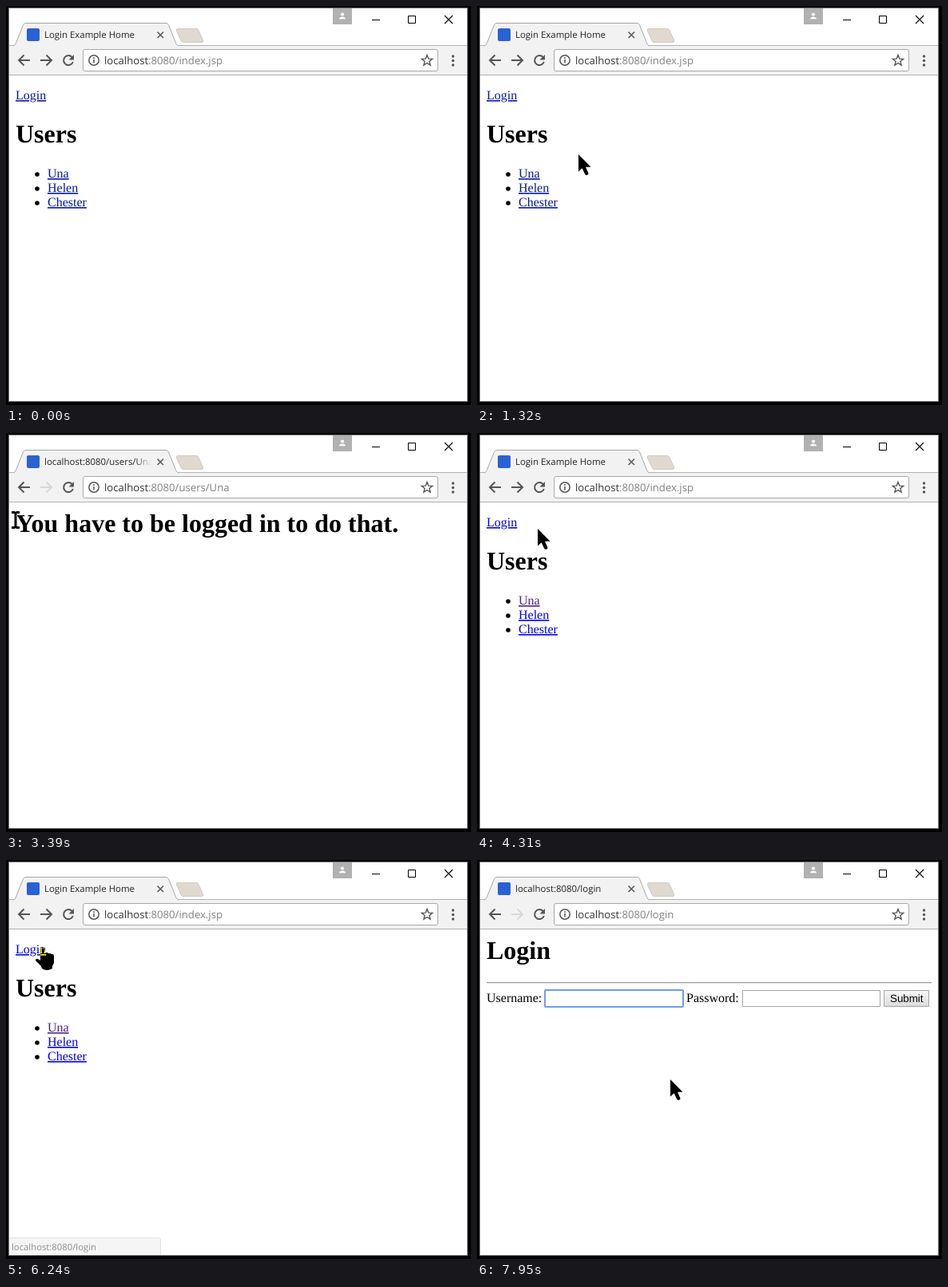
Recreate the animation shown at these times as an HTML page. Size 582 px wide and 500 px high, loop 8000 ms.

```html
<!DOCTYPE html>
<html lang="en">
<head>
<meta charset="utf-8">
<title>Login example</title>
<style>
  html, body { margin: 0; width: 100%; height: 100%; overflow: hidden; background: #000; }
  svg { display: block; width: 582px; height: 500px; }
  text { text-rendering: geometricPrecision; white-space: pre; }
  .ui { font-family: "Open Sans", "Noto Sans", sans-serif; }
  .page { font: 16px "Liberation Serif", "Times New Roman", serif; }
  .h1 { font-weight: bold; font-size: 32px; }
  .link { fill: var(--link); text-decoration: underline; }
  .seen { fill: var(--seen); }
  #cursor { mix-blend-mode: difference; fill: #fff; }
  .icon { fill: none; stroke: #555; stroke-width: 2; }
</style>
</head>
<body>
<svg viewBox="0 0 582 500">
  <defs>
    <linearGradient id="fade"><stop stop-color="#f2f2f2" stop-opacity="0"/><stop offset="1" stop-color="#f2f2f2"/></linearGradient>
    <linearGradient id="face" x2="0" y2="1"><stop stop-color="#f6f6f6"/><stop offset="1" stop-color="#dcdcdc"/></linearGradient>
    <clipPath id="tabClip"><path d="M46 24H182V48H46Z"/></clipPath>
  </defs>

  <path d="M0 0H582V500H0Z"/>
  <path d="M3 2H578V496H3Z" fill="#777"/>
  <path d="M4 3H577V495H4Z" fill="#fff"/>

  <!-- title bar -->
  <path d="M409 3H433V23H409Z" fill="#b1b1b1"/>
  <circle cx="421" cy="10.5" r="2.1" fill="#fff"/>
  <path d="M417 16.3C417 12.6 425 12.6 425 16.3Z" fill="#fff"/>
  <g fill="none" stroke="#000">
    <path d="M458 17.5H468M503.5 12.5H512.5V21.5H503.5Z"/>
    <path d="M549 12L559 22M559 12L549 22" stroke-width="1.1"/>
  </g>

  <!-- tab strip and toolbar -->
  <path d="M4 50H577V86H4Z" fill="#f2f2f2"/>
  <path d="M4 49.5H577M4 86.5H577" stroke="#b2b2b2"/>
  <path d="M9 50C12 49 12 47 13 45L21 25C22 22.5 23 21.5 25 21.5H200C202 21.5 203 22.5 204 25L212 45C213 47 213 49 216 50" fill="#f2f2f2" stroke="#a6a6a6"/>
  <path d="M10 50H215V51H10Z" fill="#f2f2f2"/>
  <path d="M215 28.5H238Q240 28.5 241 30.5L246.500 43Q247 45.500 245 45.500H222Q220 45.500 219 43.500L213.500 31Q212.500 28.500 215 28.500Z" fill="#e0d9cf" stroke="#d0c9c0"/>
  <rect x="26" y="28" width="16" height="16" rx="2" fill="#2a62d4"/>
  <g clip-path="url(#tabClip)">
    <text id="title" class="ui" x="48" y="40" font-size="11.45" fill="#222"/>
    <path d="M162 24H182V48H162Z" fill="url(#fade)"/>
  </g>
  <path d="M189.500 32.500L197 40M197 32.500L189.500 40" stroke="#5a5a5a" stroke-width="1.600"/>
  <path class="icon" d="M30 68H16.500M22.500 61.500L16 68L22.500 74.500"/>
  <path id="forward" class="icon" d="M43 68H56.500M50.500 61.500L57 68L50.500 74.500"/>
  <path class="icon" d="M82.700 64.200A6 6 0 1 0 83.800 70"/>
  <path d="M85 61V67.500H78.500Z" fill="#555"/>
  <rect x="96.500" y="54.500" width="444" height="27" rx="2.500" fill="#fff" stroke="#a9a9a9"/>
  <circle cx="110" cy="68" r="6.200" class="icon" style="stroke-width:1.500"/>
  <path d="M110 67V71.500M110 64.300V65.900" stroke="#555" stroke-width="1.600"/>
  <text class="ui" x="123" y="73" font-size="13.150" fill="#333">localhost<tspan id="path" fill="#808080"/></text>
  <path id="star" class="icon" style="stroke-width:1.400"/>
  <g fill="#555"><circle cx="559.500" cy="63" r="1.700"/><circle cx="559.500" cy="68.500" r="1.700"/><circle cx="559.500" cy="74" r="1.700"/></g>

  <!-- pages -->
  <g id="home" class="page">
    <text class="link" x="12" y="117">Login</text>
    <text class="h1" x="12" y="171">Users</text>
    <circle cx="39" cy="211" r="2.800"/><text class="link seen" x="52" y="215">Una</text>
    <circle cx="39" cy="229" r="2.800"/><text class="link" x="52" y="233">Helen</text>
    <circle cx="39" cy="247" r="2.800"/><text class="link" x="52" y="251">Chester</text>
  </g>
  <g id="denied" class="page">
    <text class="h1" x="12" y="124">You have to be logged in to do that.</text>
  </g>
  <g id="login" class="page">
    <text class="h1" x="12" y="124">Login</text>
    <path d="M12 153.500H569" stroke="#9a9a9a"/>
    <path d="M12 154.500H569" stroke="#e6e6e6"/>
    <text x="12" y="178">Username:</text>
    <text x="262" y="178">Password:</text>
    <g fill="#fff" stroke="#a4a4a4">
      <path d="M85.500 163.500H257.500V183.500H85.500Z"/>
      <path d="M332.500 163.500H504.500V183.500H332.500Z"/>
      <path d="M509.500 163.500H565.500V183.500H509.500Z" fill="url(#face)"/>
    </g>
    <rect id="focus" x="85" y="163" width="173" height="21" rx="1" fill="none" stroke="#6f9cec" stroke-width="2"/>
    <path id="caret" d="M87 166H88V181H87Z"/>
    <text x="517" y="178" style="font:13.330px 'Liberation Sans',Arial,sans-serif">Submit</text>
  </g>

  <g id="status">
    <path d="M4 473.500H191Q193.500 473.500 193.500 476V495H4Z" fill="#f2f2f2"/>
    <path d="M4 473.500H191Q193.500 473.500 193.500 476V495" fill="none" stroke="#d6d6d6"/>
    <text id="target" class="ui" x="7" y="489" font-size="11.300" fill="#606060"/>
  </g>

  <g id="cursor">
    <path id="arrow" d="M0 0V21.500L4.600 17.300L8.300 25Q9.500 26.500 11 25.800Q13 25 12.300 23.300L9 15.800H15.500Z"/>
    <path id="beam" d="M-5 -11H-1L0 -10L1 -11H5V-8H1.500V8H5V11H1L0 10L-1 11H-5V8H-1.500V-8H-5Z"/>
    <path id="hand" d="M-2 1Q0 -1 3 1L4 7H7L8 8H11L12 9H14L15 11V20L13 24V27Q6 31 0 27L-1 24L-5 20L-8 17Q-8 14 -5 15L-2 17Z"/>
  </g>
</svg>
<script>
const $ = id => document.getElementById(id);
const LOOP = 8000, START = 80, STEP = 76.85;

// time, x, y, cursor shape from here on
const moves = [
  [90, 308, 478, 'arrow'], [400, 304, 290, 'arrow'], [630, 295, 215, 'arrow'],
  [860, 210, 148, 'arrow'], [1300, 130, 185, 'arrow'], [1700, 69, 209, 'arrow'],
  [1775, 73, 207, 'hand'], [2230, 73, 207, 'hand'], [2305, 72, 204, 'arrow'],
  [3090, 72, 204, 'arrow'], [3310, 22, 125, 'beam'], [3385, 12, 109, 'beam'],
  [3400, 12, 109, 'beam'], [3540, 14, 94, 'arrow'], [3930, 20, 73, 'arrow'],
  [4160, 20, 73, 'arrow'], [4770, 237, 257, 'arrow'], [5150, 237, 257, 'arrow'],
  [5455, 192, 135, 'arrow'], [5470, 192, 135, 'arrow'], [5990, 37, 108, 'arrow'],
  [6160, 45, 109, 'hand'], [6465, 45, 109, 'arrow'], [6695, 132, 137, 'arrow'],
  [6930, 150, 155, 'arrow'], [7080, 158, 172, 'beam'], [7400, 165, 174, 'beam'],
  [7540, 195, 196, 'arrow'], [7775, 242, 275, 'arrow']
];
const pages = [[0, 'home'], [2160, 'denied'], [4160, 'home'], [6470, 'login']];
const addresses = [[0, '/index.jsp'], [2090, '/users/Una'], [4080, '/index.jsp'], [6390, '/login']];
const statusAlpha = [
  [0, 0], [1780, .35], [1860, .7], [1940, 1], [2460, .6], [2540, .3], [2620, 0],
  [6170, .35], [6240, .7], [6320, 1], [6550, .6], [6620, .35], [6700, .18], [6780, 0]
];

const current = (table, t) => table.findLast(row => row[0] <= t);
const show = (id, on) => { $(id).style.display = on ? '' : 'none'; };

function placeCursor(t) {
  const now = START + 10 + Math.floor((t - START) / STEP) * STEP;
  const a = current(moves, now);
  show('cursor', a && t >= 90);
  if (!a) return;
  const b = moves[moves.indexOf(a) + 1] || a;
  const k = a === b ? 0 : (now - a[0]) / (b[0] - a[0]);
  const mix = i => Math.round(a[i] + (b[i] - a[i]) * k);
  $('cursor').setAttribute('transform', `translate(${mix(1)} ${mix(2)})`);
  for (const id of ['arrow', 'beam', 'hand']) show(id, id === a[3]);
}

function render(t) {
  const page = current(pages, t)[1];
  for (const id of ['home', 'denied', 'login']) show(id, id === page);
  const returned = t >= 4160;
  $('home').style.setProperty('--link', returned ? '#0000ee' : '#04189c');
  $('home').style.setProperty('--seen', returned ? '#4d2384' : '#04189c');

  const address = current(addresses, t)[1];
  $('path').textContent = ':8080' + address;
  $('title').textContent = address === '/index.jsp' ? 'Login Example Home' : 'localhost:8080' + address;
  $('forward').style.stroke = page === 'home' ? '#555' : '#d8d8d8';

  $('status').style.opacity = current(statusAlpha, t)[1];
  $('target').textContent = 'localhost:8080' + (t < 4000 ? '/users/Una' : '/login');
  show('focus', t >= 7410);
  show('caret', t >= 7410 && t < 7950);
  placeCursor(t);
}

const starPoints = Array.from({ length: 10 }, (_, i) => {
  const r = i % 2 ? 3 : 7, a = i * Math.PI / 5;
  return (527 + r * Math.sin(a)).toFixed(1) + ' ' + (68.5 - r * Math.cos(a)).toFixed(1);
});
$('star').setAttribute('d', 'M' + starPoints.join('L') + 'Z');

const begin = performance.now();
function tick() {
  render((performance.now() - begin) % LOOP);
  requestAnimationFrame(tick);
}
tick();
</script>
</body>
</html>
```
